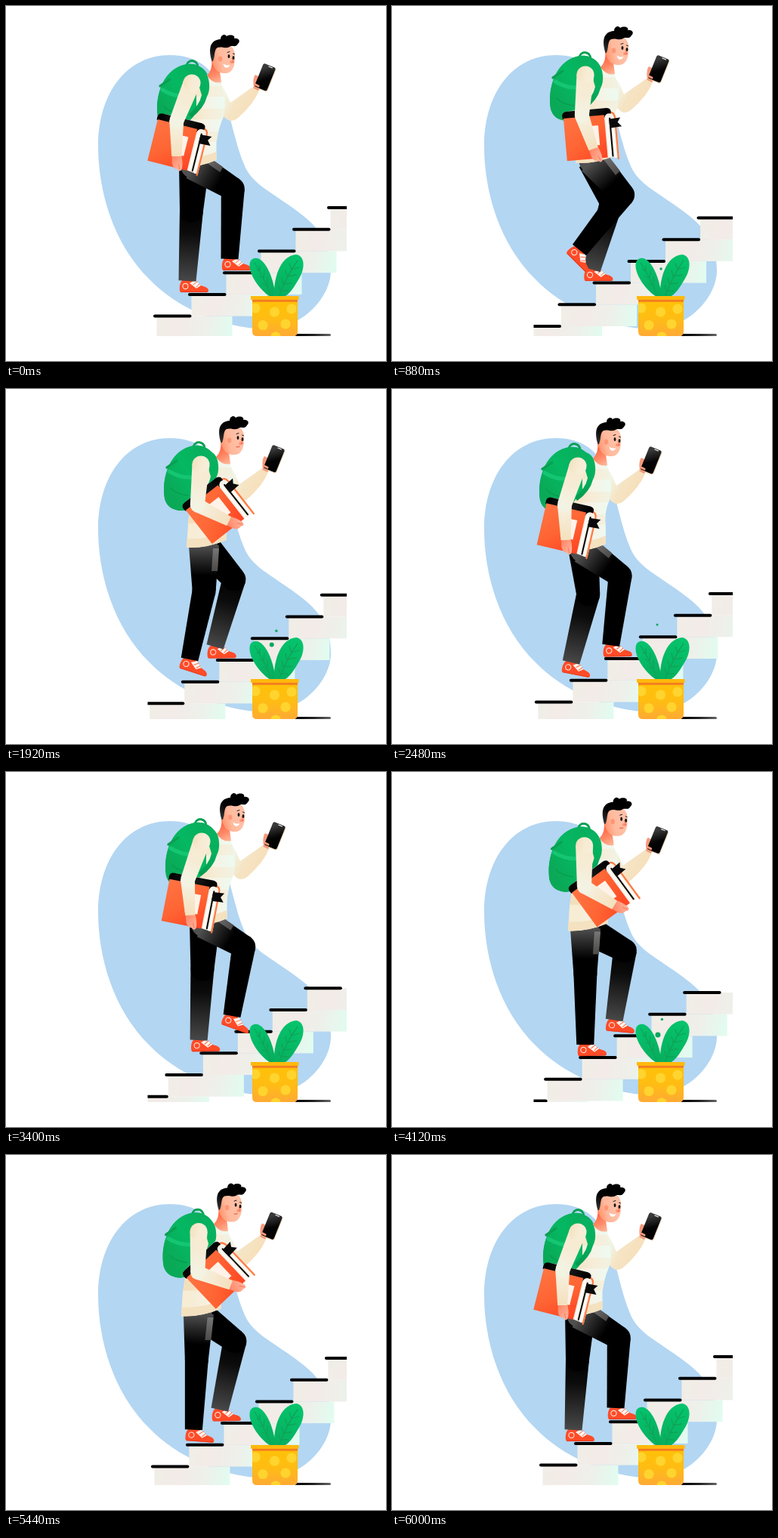
These frames come from a looping animation (503x470 px, 6.04 s). An HTML page with a canvas:

```html
<!DOCTYPE html>
<html lang="en">
<head>
<meta charset="utf-8">
<title>Student climbing stairs</title>
<style>
html, body { margin: 0; width: 100%; height: 100%; overflow: hidden; background: #fff; }
canvas { display: block; width: 503px; height: 470px; }
</style>
</head>
<body>
<canvas id="stage" width="503" height="470"></canvas>
<script>
const c = document.getElementById('stage').getContext('2d');
const LOOP = 6040, STEP = 40, CYCLE = 1200;
const rad = Math.PI / 180;

// Smooth periodic curve through rows of [time, ...values]
function track(rows) {
  const n = rows.length;
  const row = i => {
    const k = ((i % n) + n) % n, turn = Math.floor(i / n) * CYCLE;
    return [rows[k][0] + turn, ...rows[k].slice(1)];
  };
  return time => {
    const p = ((time % CYCLE) + CYCLE) % CYCLE;
    let i = n - 1;
    while (rows[i][0] > p) i--;
    const [a, b, d, e] = [row(i - 1), row(i), row(i + 1), row(i + 2)];
    const span = d[0] - b[0], u = (p - b[0]) / span;
    const u2 = u * u, u3 = u2 * u;
    return b.slice(1).map((v, j) => {
      const k = j + 1;
      const m0 = (d[k] - a[k]) / (d[0] - a[0]) * span;
      const m1 = (e[k] - b[k]) / (e[0] - b[0]) * span;
      return (2 * u3 - 3 * u2 + 1) * v + (u3 - 2 * u2 + u) * m0
        + (3 * u2 - 2 * u3) * d[k] + (u3 - u2) * m1;
    });
  };
}

// ankle x, y, foot angle
const ankleAt = track([
  [0, 296, 335, 0], [280, 274.5, 349, 0], [600, 250, 364, 0], [680, 247, 362, 11],
  [720, 243, 358, 18], [880, 248, 323, 45], [1000, 299, 323, 20], [1100, 305, 327, 7]
]);
const hipAt = track([
  [0, 249, 211], [90, 254, 212], [280, 264, 205], [400, 263, 201],
  [600, 253, 211], [720, 262, 207], [880, 266, 205], [1000, 263, 201]
]);
// shoulders x, y, backpack sway
const chestAt = track([
  [0, 0, 0, 0], [80, 0, 0, -5], [280, 6, -11, -3], [400, 10, -10, -2],
  [600, 8, -1, -1], [720, 12, -2, -3], [880, 10, -11, -1], [1000, 13, -10, -2]
]);
// upper arm, forearm and book angles
const armAt = track([
  [0, -22, 0, 14], [80, -19, 2, 13], [240, -12, 10, 5], [360, -5, 28, -12], [480, -1, 52, -31],
  [600, 0, 68, -43], [720, -5, 63, -38], [880, -5, 19, -5], [1000, -20, 4, 11]
]);

function fill(path, color) {
  c.fillStyle = color;
  c.fill(new Path2D(path));
}
function line(path, color, width) {
  c.strokeStyle = color;
  c.lineWidth = width;
  c.lineCap = 'round';
  c.lineJoin = 'round';
  c.stroke(new Path2D(path));
}
function dot(x, y, rx, color, ry = rx, turn = 0) {
  c.fillStyle = color;
  c.beginPath();
  c.ellipse(x, y, rx, ry, turn, 0, 7);
  c.fill();
}
function rect(x, y, w, h, color) {
  c.fillStyle = color;
  c.fillRect(x, y, w, h);
}
function grad(x0, y0, x1, y1, ...colors) {
  const g = c.createLinearGradient(x0, y0, x1, y1);
  colors.forEach((col, i) => g.addColorStop(i / (colors.length - 1), col));
  return g;
}
function at(x, y, angle, draw) {
  c.save();
  c.translate(x, y);
  c.rotate(angle * rad);
  draw();
  c.restore();
}
function limb(a, b, ra, rb, color) {
  const len = Math.hypot(b[0] - a[0], b[1] - a[1]);
  const nx = (a[1] - b[1]) / len, ny = (b[0] - a[0]) / len;
  c.fillStyle = color;
  c.beginPath();
  c.moveTo(a[0] + nx * ra, a[1] + ny * ra);
  c.lineTo(b[0] + nx * rb, b[1] + ny * rb);
  c.lineTo(b[0] - nx * rb, b[1] - ny * rb);
  c.lineTo(a[0] - nx * ra, a[1] - ny * ra);
  c.fill();
}

function backdrop() {
  rect(0, 0, 503, 470, '#fff');
  fill('M217 65C160 65 122 115 122 186C122 245 142 315 190 362C225 398 285 427.500 345 427.500' +
    'C392 427 430 386 430 350C430 305 405 285 375 264C345 243 326 234 316 212' +
    'C303 183 298 145 285 112C274 82 252 65 217 65Z', '#b3d6f2');
}

function stairs(t) {
  const p = (t % 600) / 600;
  const steps = [];
  for (let i = -1; i < 7; i++) {
    const x = 197 + 46 * (i - p), y = 410.6 - 28.7 * (i - p);
    if (y > 264) steps.push([x, y]);
  }
  c.save();
  c.beginPath();
  c.rect(187.5, 262, 263.5, 175);
  c.clip();
  for (const [x, y] of steps) {
    rect(x + 2.5, y, 100, 28.7, grad(x, y, x + 102, y + 20, '#f0eee6', '#f3ebe8', '#eef0ea', '#e1fcf0'));
  }
  for (const [x, y] of steps) {
    if (y < 437) line(`M${x} ${y}h46.500`, '#000', 4);
  }
  c.restore();
}

function shoe() {
  fill('M-10 13C-11 5-8-2-4-2L7-2C11 4 18 6 24 8C29 10 29 15 26 15L-9 15Z', '#ff4b27');
  fill('M3 3L10-1L18 6L12 10Z', '#fff3ec');
  line('M8 5l5-4M12 8l4-4', '#ff6a45', 1);
  c.strokeStyle = '#ffd9cc';
  c.lineWidth = 1.2;
  c.beginPath();
  c.arc(-2.5, 7, 3.6, 0, 7);
  c.stroke();
  line('M-8 14.6H26', '#e83a1c', 1);
}

function leg(hip, [ax, ay, turn], near) {
  const L1 = 60, L2 = 93, dx = ax - hip[0], dy = ay - hip[1];
  const real = Math.hypot(dx, dy), d = Math.min(real, L1 + L2);
  const ux = dx / real, uy = dy / real;
  const along = (L1 * L1 + d * d - L2 * L2) / (2 * d);
  const out = Math.sqrt(Math.max(0, L1 * L1 - along * along));
  const knee = [hip[0] + ux * along + uy * out, hip[1] + uy * along - ux * out];
  const ankle = [ax, ay];
  at(ax, ay, turn, shoe);
  const thigh = near ? grad(...hip, ...knee, '#505050', '#262626', '#000', '#000') : '#000';
  const shin = near ? '#000' : grad(...knee, ...ankle, '#000', '#0c0c0c', '#2a2a2a', '#484848');
  limb(knee, ankle, 15.5, 11.5, shin);
  dot(...hip, 18, near ? '#505050' : '#000');
  limb(hip, knee, 20, 15.5, thigh);
  dot(...knee, 15.5, '#000');
  if (!near) return;
  at(...hip, Math.atan2(knee[1] - hip[1], knee[0] - hip[0]) / rad, () =>
    fill('M4-20L34-18L34-10L4-12Z', grad(4, 0, 34, 0, '#777', '#4d4a48')));
}

function phoneArm() {
  fill('M282 103L290 112L297 128L327 107L335 112Q328 130 306 149Q297 156 289 147L280 135Z',
    grad(284, 120, 322, 140, '#f1f8ec', '#f5e4c4', '#f7dfba'));
  fill('M328 108C327 101 327 95 330 91L334 93L338 107L334 112Z', '#f79a7c');
  at(343, 94.8, 22, () => {
    c.fillStyle = '#e8cfae';
    c.beginPath();
    c.roundRect(-7, -16, 16.5, 33, 2.5);
    c.fill();
    c.fillStyle = grad(-9, -10, 9, 14, '#3a3a3a', '#050505', '#000');
    c.beginPath();
    c.roundRect(-9, -17, 17.5, 33, 2.5);
    c.fill();
    line('M-1-15.5h5', '#fff', 1);
  });
  line('M330 104l4 2M329 108l4 2', '#f79a7c', 3);
}

function torso([ux, uy], [hx, hy]) {
  const X = v => v + ux, Y = v => v + uy;
  const body = new Path2D(
    `M${X(248)} ${Y(94)}L${X(267)} ${Y(91)}L${X(284)} ${Y(99)}Q${X(293)} ${Y(122)} ${X(288)} ${Y(146)}` +
    `Q${X(280)} ${Y(166)} ${hx + 29.5} ${hy - 30}L${hx + 29.5} ${hy - 7}` +
    `Q${hx + 4} ${hy + 4} ${hx - 23} ${hy + 3}L${hx - 21} ${hy - 28}L${X(234)} ${Y(125)}Z`);
  c.save();
  c.clip(body);
  rect(190, 70, 140, 160, grad(X(235), 0, X(292), 0, '#f7ecd4', '#f6f3e6', '#ecfbf2'));
  for (const y of [106, 136, 166]) {
    rect(190, Y(y), 140, 14, grad(X(235), 0, X(292), 0, '#f3dfbc', '#f7ecd6', '#f1f3e4'));
  }
  fill(`M${hx - 26} ${hy - 9}Q${hx + 5} ${hy - 7} ${hx + 32} ${hy - 19}V${hy + 9}H${hx - 26}Z`, '#f4e1c0');
  c.restore();
}

function head(smile) {
  fill('M272 70Q274 84 266 92Q274 104 285 101L283 86Z', grad(272, 80, 282, 101, '#ff6c4a', '#ff8a67', '#ffb598'));
  fill('M273 60C273 53 282 50 291 51C301 52 304 60 303 70C303 82 298 90 289 89C279 89 272 80 272 66Z',
    grad(272, 76, 296, 70, '#ff8f67', '#ffb99c', '#ffc0a6'));
  dot(283.5, 70, 2.8, '#ff9676', 3.6);
  dot(299, 74, 3, '#ff957a', 2);
  fill('M272.500 73C268 58 269 45 284 44C284 38 290 36 292 40C297 37 304 39 302 43' +
    'C308 42 311 47 307 50C304 56 299 51 296 54C291 57 286 53 280 55C275 58 277 66 274 73Z',
    grad(270, 70, 290, 45, '#333', '#050505', '#000'));
  dot(295, 66.5, 1.4, '#111', 2.6);
  dot(301, 68.5, 1.4, '#111', 2.6);
  line('M293 61.5l3-1M300.500 63l2 .8', '#1a1a1a', 1);
  line('M299 69l2 5-2 .5', '#f4714f', 1);
  if (smile) fill('M287.500 76.500Q292 79.500 296.500 78Q294 83.500 289.500 81Q288 79.500 287.500 76.500Z', '#fff');
  else line('M293 78.500q2 .8 4-.5', '#ee6247', 1.3);
}

function backpack(sway) {
  c.save();
  c.translate(sway, 0);
  line('M239 80C239 70 254 70 254 81', '#08a055', 2.6);
  fill('M201 147C197 122 206 86 235 78C252 73 266 83 269 97C271 113 262 130 250 144C239 158 228 166 216 162C208 160 203 155 201 147Z',
    grad(202, 130, 262, 92, '#0aa957', '#05b862', '#08ad5c'));
  line('M204 106l13-9', '#0a9f52', 3);
  line('M207 111Q222 120 238 119', '#14c672', 5);
  line('M209 133Q216 141 232 143', '#079d50', 1.3);
  c.restore();
}

function strap() {
  fill('M248 82Q268 83 269 103Q270 112 266 120Q262 136 245 148L242 143Q256 132 259 118Q254 100 248 82Z',
    grad(262, 90, 254, 146, '#08b260', '#05b05d', '#079a50'));
}

function book() {
  fill('M0-2L2-8Q6-10 60-9Q69-9 69 0L69 58L54 56Z', '#f6f1e6');
  line('M61-3Q68-3 68 6L68 59', '#ff7a42', 2.2);
  line('M61 5V55', '#000', 2);
  line('M57 2V55M64.500 4V57', '#fff', 1.6);
  fill('M-1 1Q-3-9 5-9L58-9Q65-8 63-1Q56-3 54 4Z', grad(0, 0, 60, 0, '#000', '#1c1c1c', '#000'));
  fill('M0 0H54V56.500H0Z', grad(0, 0, 50, 60, '#ff7443', '#ff6534', '#ff4322'));
  fill('M28 13H45V39H28Z', '#fff2e9');
  fill('M60 6L75 5L71 11L76 17L60 18Z', '#0a0a0a');
}

function bookArm([ux, uy], [upper, fore, tilt]) {
  const end = (p, angle, len) => [p[0] + Math.sin(angle * rad) * len, p[1] + Math.cos(angle * rad) * len];
  const shoulder = [246 + ux, 102 + uy];
  const elbow = end(shoulder, upper, 54), wrist = end(elbow, fore, 47);
  at(...wrist, tilt, () => {
    c.translate(-36, tilt * 0.1 - 43);
    book();
  });
  at(...wrist, -fore, () => {
    fill('M-6-3L6-3Q9 8 7 17Q4 22 1 17Q-5 16-6 9Z', grad(-6, 0, 7, 12, '#ff8465', '#ffad94'));
    line('M3 11l1 6', '#f4785a', 1);
  });
  const sleeve = grad(shoulder[0] - 14, shoulder[1], shoulder[0] + 14, shoulder[1] + 8, '#f3e0bd', '#f7ecd5', '#f7efdc');
  limb(elbow, wrist, 9.5, 6.5, grad(...elbow, ...wrist, '#f3f3e4', '#f6e9d0', '#f4e0bd'));
  dot(...elbow, 9.5, '#f3f3e4');
  limb(shoulder, elbow, 11.5, 9.5, grad(...shoulder, ...elbow, '#f7ead0', '#f6ecd5', '#f3f3e4'));
  dot(...shoulder, 11.5, sleeve);
}

function person(t) {
  const hip = hipAt(t), chest = chestAt(t);
  const far = ankleAt(t + 600);
  far[0] -= 10;
  const p = t % CYCLE;
  const withChest = draw => at(chest[0], chest[1], 0, draw);
  withChest(phoneArm);
  leg(hip, far, false);
  leg(hip, ankleAt(t), true);
  withChest(() => backpack(chest[2]));
  torso(chest, hip);
  withChest(() => {
    head(p < 400 || p > 800);
    // Rear half of the bag overlaps the back of the shirt
    c.save();
    c.beginPath();
    c.rect(180, 60, 72, 120);
    c.clip();
    backpack(chest[2]);
    c.restore();
    strap();
  });
  bookArm(chest, armAt(t));
}

// start, end, from, to, radii
const sparks = [
  [840, 2000, 356, 349, 358, 318, 1.7, 1.7],
  [1680, 2520, 352, 350, 351, 310, 3.6, 1.4],
  [3480, 4400, 356, 349, 358, 318, 1.7, 1.7],
  [4080, 4920, 352, 350, 351, 310, 3.6, 1.4]
];
function particles(t) {
  for (const [t0, t1, x0, y0, x1, y1, r0, r1] of sparks) {
    if (t < t0 || t > t1) continue;
    const u = (t - t0) / (t1 - t0), mix = (a, b) => a + (b - a) * u;
    dot(mix(x0, x1), mix(y0, y1), mix(r0, r1), '#06a85c');
  }
}

function plant() {
  line('M384 435.500H428.500', grad(384, 0, 430, 0, '#000', '#222', '#666'), 3);
  fill('M350 385C335 376 317 350 324 337C334 326 352 344 357 385Z', grad(324, 340, 356, 380, '#05c26d', '#07ad5d'));
  fill('M355 385C354 362 362 331 384 329C397 331 396 350 386 364C379 376 374 382 368 385Z',
    grad(388, 332, 360, 382, '#05c46c', '#07b05f'));
  line('M329 340Q340 356 351 384M332 349l4 2 0-7M335 358l6 2 1-10M340 368l6 2 0-11', '#0fa358', 1.3);
  line('M386 337Q372 356 362 383M375 341l3 8 10-3M370 350l2 8 12-2M365 360l2 8 11-1M361 370l2 7 10 0', '#0fa358', 1.3);
  const pot = new Path2D('M326 388H386V431Q386 437 380 437H332Q326 437 326 431Z');
  c.save();
  c.clip(pot);
  rect(324, 386, 64, 52, grad(0, 388, 0, 437, '#ffc107', '#ffbd12', '#ffaa35'));
  for (const [x, y] of [[330, 400], [355.5, 405], [378, 401], [340, 422.5], [370, 421], [357, 438]]) {
    dot(x, y, 6.6, '#ffd42e');
  }
  rect(326, 388.5, 60, 3.2, '#f47b20');
  c.restore();
  rect(324, 384, 63.5, 4.8, '#ffb90c');
}

function frame(now) {
  const t = Math.floor((now % LOOP) / STEP) * STEP;
  backdrop();
  stairs(t);
  person(t);
  particles(t);
  plant();
}

const start = performance.now();
function tick() {
  frame(performance.now() - start);
  requestAnimationFrame(tick);
}
tick();
</script>
</body>
</html>
```
